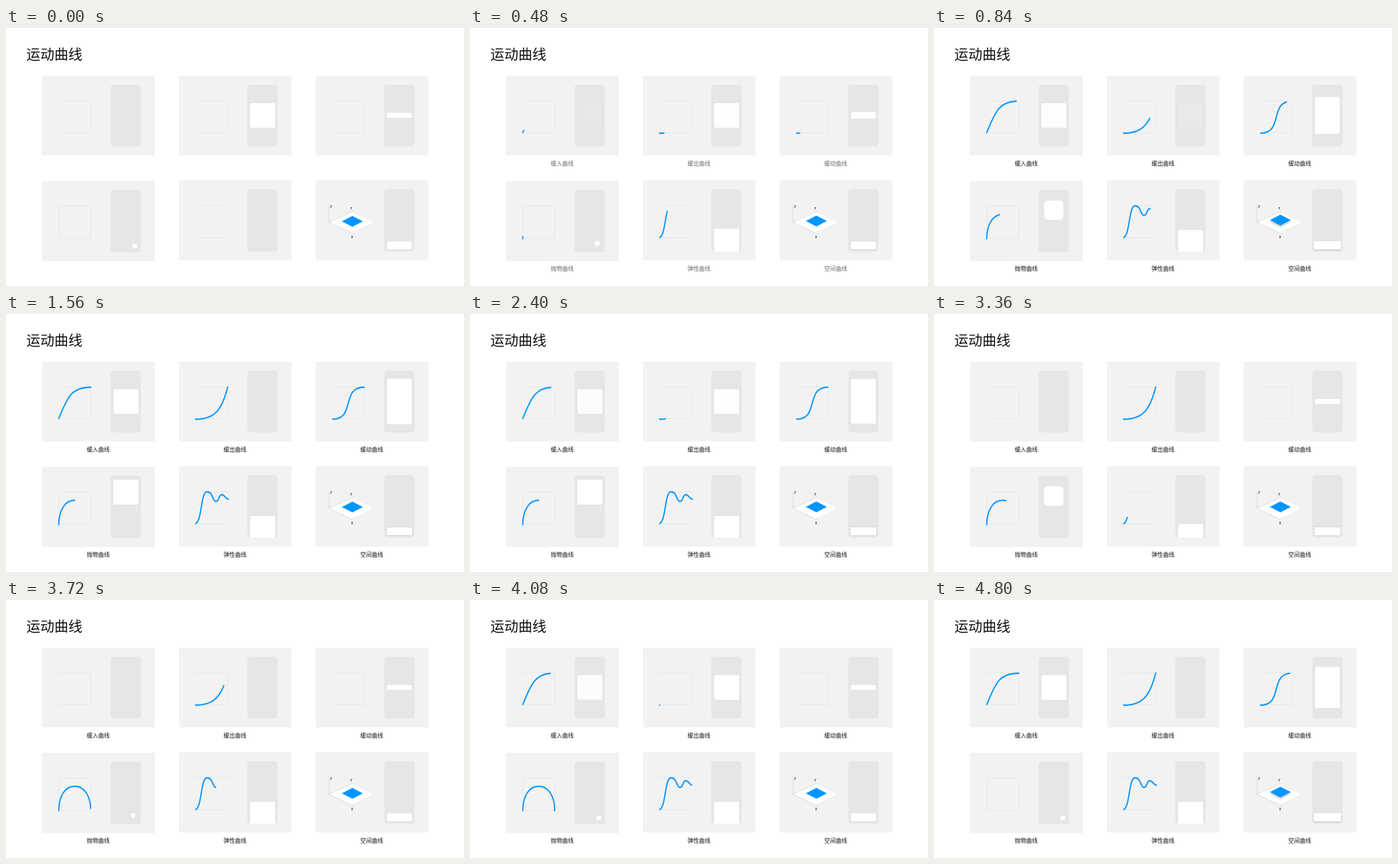
An HTML page for the animation above (4840 ms loop, 720 px wide and 405 px high).

```html
<!DOCTYPE html>
<html lang="zh">
<head>
<meta charset="utf-8">
<style>
  html, body { margin: 0; width: 100%; height: 100%; overflow: hidden; background: #fff; }
  svg { display: block; font-family: "Noto Sans CJK SC", "Noto Sans CJK", sans-serif; }
  .title { font-size: 22px; font-weight: 300; fill: #111; }
  .label { font-size: 9px; font-weight: 500; fill: #111; text-anchor: middle; }
  .axis { font: 700 4.5px Inter, sans-serif; fill: #333; }
  .guide { fill: none; stroke: #e5e5e5; stroke-width: .8; }
  .dash { fill: none; stroke: #aaa; stroke-width: .6; stroke-dasharray: 1.5 1; }
  .curve { fill: none; stroke: #0095ff; stroke-width: 1.9; stroke-linecap: round;
           filter: drop-shadow(.8px 1.5px .7px rgba(0,110,190,.2)); }
  .card { fill: #fff; filter: drop-shadow(0 .6px .6px rgba(0,0,0,.14)); }
</style>
</head>
<body>
<svg width="720" height="405" viewBox="0 0 720 405">
  <clipPath id="phone"><rect x="379.5" y="253" width="47.5" height="98" rx="5"/></clipPath>
  <text class="title" x="32" y="48.5">运动曲线</text>
  <g id="panels"></g>
  <path class="guide" d="M83 114.5H133.5V164.5H83M297 114.5H348.5V164.5H297M512.5 114.5H563.5V164.5H512.5M83 279.5H133.5V330.5H83ZM297 278.5H351M297 329.5H351"/>
  <path fill="#fff" d="M508 305L543 289L577 305L543 321Z"/>
  <path class="dash" d="M508 280V305L547 287M508 305L547 324"/>
  <text class="axis" x="509.5" y="281.5">Z</text>
  <text class="axis" x="541" y="284.5">Y</text>
  <text class="axis" x="542.5" y="329.5">X</text>
  <path id="tile" fill="#0095ff" d="M528 303.5L544.5 295L561 303.5L544.5 312Z"/>
  <g id="cards"></g>
  <g id="curves"></g>
</svg>
<script>
const LOOP = 4840, BEAT = 1880;
const $ = id => document.getElementById(id);
const names = ["缓入曲线", "缓出曲线", "缓动曲线", "抛物曲线", "弹性曲线", "空间曲线"];
const paths = [
  "M83 164C98 126 105 114.7 133.5 114.7",
  "M298 165C330 165 340 148 348.5 114.5",
  "M513.5 165C550 165 526 114.7 563 114.7",
  "M83 330.5C83 306 94 292.3 108 292.3S133.2 306 133.2 330.5",
  "M298 328.8C308 326 306 279 316 279S324 294 330 294S334 283.5 339 283.5S345 290.5 349.5 290.5"
];

$("panels").innerHTML = names.map((name, i) => {
  const row = i > 2, x = 57 + 215 * (i % 3), y = row ? (i === 3 ? 240 : 239) : 75;
  return `<rect x="${x}" y="${y}" width="177" height="${row ? 126 : 125}" fill="#f2f2f2"/>
    <rect x="${x + 107.5}" y="${y + 14}" width="47.5" height="${row ? 98 : 97}" rx="5" fill="#e6e6e6"/>
    <text class="label" x="${x + 88}" y="${row ? 381 : 215.5}">${name}</text>`;
}).join("");
$("curves").innerHTML = paths.map(d => `<path class="curve" pathLength="1" d="${d}"/>`).join("");
$("cards").innerHTML = names.map((_, i) =>
  `<g${i === 4 ? ' clip-path="url(#phone)"' : ""}><rect class="card"/></g>`).join("");

const curves = [...document.querySelectorAll(".curve")];
const cards = [...document.querySelectorAll(".card")];
const labels = [...document.querySelectorAll(".label")];

const ramp = (t, start, length) => Math.min(1, Math.max(0, (t - start) / length));
const easeOut = p => 1 - (1 - p) ** 2;
const smooth = p => p * p * (3 - 2 * p);
const cubic = p => p < .5 ? 4 * p ** 3 : 1 - 4 * (1 - p) ** 3;
const spring = ms => ms <= 0 ? 0 : 1 - Math.exp(-.014 * ms) * Math.cos(.016 * ms);

function draw(i, amount) {
  curves[i].style.display = amount > .0005 ? "" : "none";
  curves[i].setAttribute("stroke-dasharray", `${amount} 2`);
}

function place(i, x, y, width, height, rx = 1.5, opacity = 1) {
  const attrs = { x, y, width, height, rx, opacity };
  for (const key in attrs) cards[i].setAttribute(key, attrs[key]);
}

function render(t) {
  const beat = t % BEAT;
  labels.forEach(label => label.setAttribute("opacity", ramp(t, 200, 450)));

  // decelerate: the card fades in and out
  const enter = t < 3400
    ? easeOut(ramp(t, 470, 480)) - ramp(t, 2200, 700) ** 2
    : easeOut(ramp(t, 3750, 480));
  draw(0, enter);
  place(0, 168.7, 118, 39.5, 38.8, 1.5, enter);

  // accelerate: the card fades away, then resets
  const exit = ramp(beat, 280, 700) ** 2 * (1 - smooth(ramp(beat, 1700, 420)));
  draw(1, exit);
  place(1, 383.7, 118, 39.5, 38.8, 1.5, Math.max(0, 1 - 2.1 * exit * exit));

  // ease in and out: the bar opens vertically
  const open = cubic(ramp(t, 280, 900)) - cubic(ramp(t, 2246, 900)) + cubic(ramp(t, 4172, 900));
  const height = 8 + 63.5 * open;
  draw(2, 1 - (1 - open) ** 1.4);
  place(2, 599, 137.2 - height / 2, 39, height);

  // parabola: the dot travels on an arc and grows
  const rise = cubic(ramp(t, 280, 800)), fall = cubic(ramp(t, 3126, 800));
  const lift = rise - fall, grow = lift ** 3, size = 8 + 31.5 * grow;
  draw(3, t < 4560 ? (rise + fall) / 2 : 0);
  place(3, 202.5 - 14.2 * (1 - (1 - lift) ** 3) - size / 2, 342.2 - 62.8 * lift - size / 2,
    size, size, size * (.5 - .45 * grow));

  // spring: the sheet bounces up from the bottom
  const start = t < 3250 ? 280 : 3312;
  const down = t < 3250 ? smooth(ramp(t, 2840, 320)) : 0;
  draw(4, easeOut(ramp(t, start, 850)) * (1 - down));
  place(4, 383.7, 352 - 35 * spring(t - start) * (1 - down), 39.3, 40);

  // space: the tile rises along z
  const z = smooth(ramp(beat, 280, 600)) - smooth(ramp(beat, 1040, 760));
  $("tile").setAttribute("transform", `translate(0 ${-2 * z})`);
  $("tile").style.filter = `drop-shadow(0 ${3.5 * z}px ${.8 * z}px rgba(0,0,0,${.16 * z}))`;
  place(5, 599 - 2 * z, 335 - .4 * z, 39 + 4 * z, 12 + .8 * z);
  cards[5].style.filter = `drop-shadow(0 ${.6 + z}px ${.6 + z}px rgba(0,0,0,.14))`;
}

const begin = performance.now();
function tick() {
  render((performance.now() - begin) % LOOP);
  requestAnimationFrame(tick);
}
tick();
</script>
</body>
</html>
```
